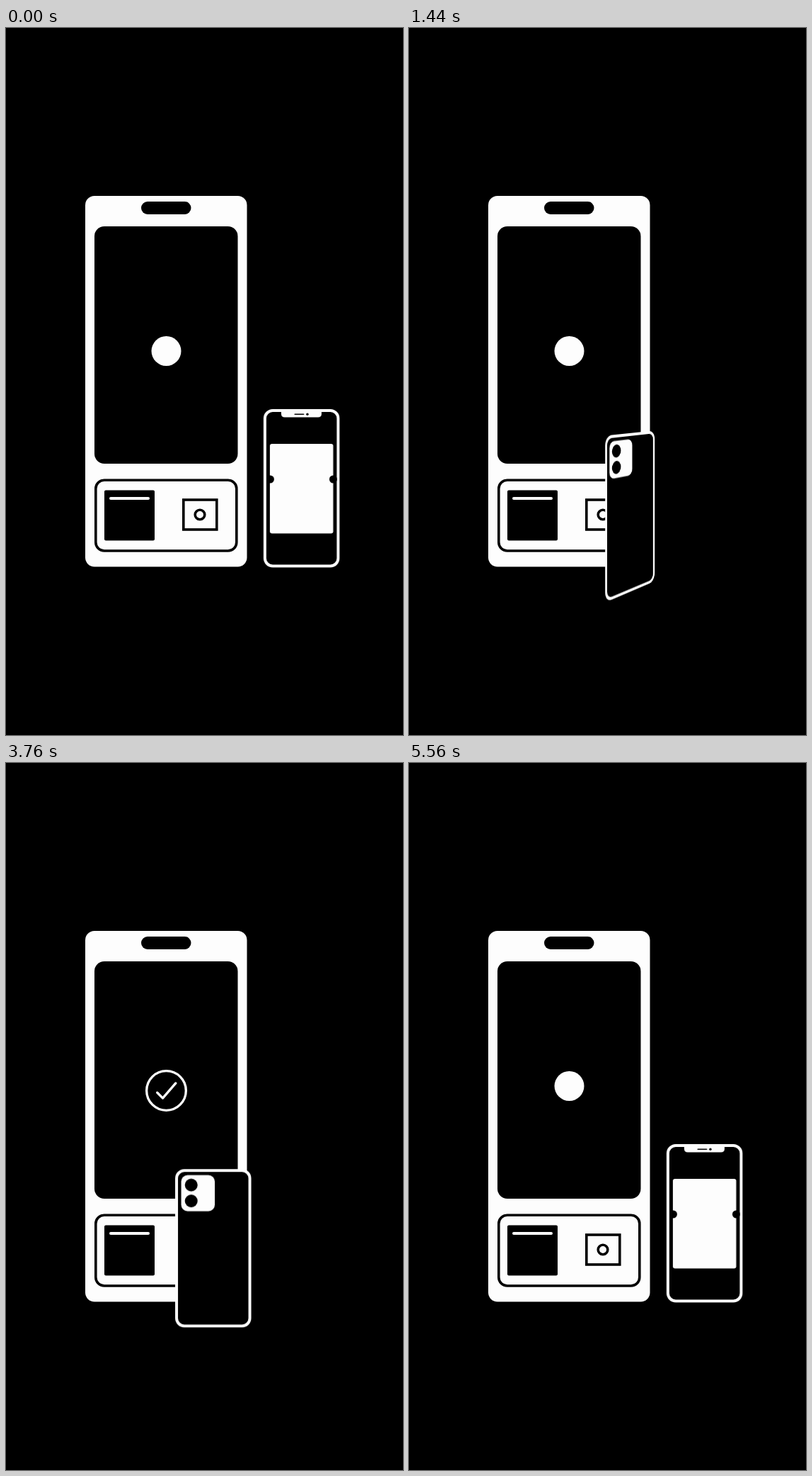
Write an HTML page that moves like this. It is 561 by 998 pixels and loops after 5920 ms.

```html
<!DOCTYPE html>
<html lang="en">
<head>
<meta charset="utf-8">
<title>Kiosk check-in</title>
<style>
  html, body { margin: 0; width: 100%; height: 100%; overflow: hidden; background: #000; }
  main { position: relative; width: 561px; height: 998px; overflow: hidden; perspective: 779px; }
  svg { position: absolute; left: 0; top: 0; display: block; overflow: visible; }
  #phone { position: absolute; left: 0; top: 0; width: 107.5px; height: 223.5px; transform-style: preserve-3d; }
  #phone svg { backface-visibility: hidden; }
  #back { transform: rotateY(180deg); }
  .white { fill: #fdfdfd; }
  .line { fill: none; stroke: #000; stroke-width: 3.6; }
  .case { fill: #000; stroke: #fdfdfd; stroke-width: 4; }
  .mark { fill: none; stroke: #fdfdfd; stroke-width: 3; stroke-linecap: round; stroke-linejoin: round; }
</style>
</head>
<body>
<main>
  <svg width="561" height="998">
    <rect class="white" x="112" y="237" width="228.5" height="523.5" rx="13"/>
    <rect x="191" y="245" width="70.5" height="18" rx="9"/>
    <rect x="125" y="280" width="202.5" height="335" rx="14"/>
    <rect class="line" x="126.8" y="638.3" width="199" height="99.7" rx="12"/>
    <rect x="139" y="652.5" width="71" height="71" rx="2"/>
    <rect class="white" x="146" y="662" width="57" height="4" rx="2"/>
    <rect class="line" x="250.8" y="666" width="47" height="42"/>
    <circle class="line" cx="274" cy="687" r="6.8"/>
    <circle id="badge" class="white" r="21"/>
    <g id="check" class="mark">
      <circle r="25"/>
      <path d="M-11.5 2.5 L-4.5 9.5 L12 -9.5"/>
    </g>
  </svg>
  <div id="phone">
    <svg id="front" width="107.5" height="223.5">
      <rect class="case" x="2" y="2" width="103.5" height="219.5" rx="11"/>
      <path class="white" d="M25 2 H82 V6.5 Q82 11.5 77 11.5 H30 Q25 11.5 25 6.5 Z"/>
      <rect x="43.5" y="6.5" width="14" height="1.6" rx=".8"/>
      <circle cx="62" cy="7.3" r="1.7"/>
      <rect class="white" x="9" y="49" width="89.5" height="126.5" rx="3"/>
      <circle cx="9.5" cy="99" r="5.5"/>
      <circle cx="98.5" cy="99" r="5.5"/>
    </svg>
    <svg id="back" width="107.5" height="223.5">
      <rect class="case" x="2" y="2" width="103.5" height="219.5" rx="11"/>
      <rect class="white" x="8.5" y="8.5" width="47.5" height="51" rx="9"/>
      <circle cx="22.7" cy="22.5" r="9"/>
      <circle cx="22.7" cy="45" r="9"/>
    </svg>
  </div>
</main>
<script>
const STEP = 40, STEPS = 148;

// Smooth curve through [step, value] keys that never overshoots them.
function track(...keys) {
  const rise = keys.slice(1).map(([s, v], i) => (v - keys[i][1]) / (s - keys[i][0]));
  const slope = keys.map((_, i) => {
    if (i === 0) return rise[0];
    const a = rise[i - 1], b = rise[i] ?? 0;
    return a * b > 0 ? 2 * a * b / (a + b) : 0;
  });
  return step => {
    if (step <= keys[0][0]) return keys[0][1];
    const i = keys.findIndex(([s]) => s > step) - 1;
    if (i < 0) return keys[keys.length - 1][1];
    const [s0, v0] = keys[i], [s1, v1] = keys[i + 1];
    const d = s1 - s0, u = (step - s0) / d, w = 1 - u;
    return v0 * (1 + 2 * u) * w * w + v1 * u * u * (3 - 2 * u)
      + d * u * w * (slope[i] * w - slope[i + 1] * u);
  };
}

const turn = track([8, 0], [15, 37.6], [21, 65], [23, 75], [30, 108], [36, 133], [38, 141], [45, 167], [53, 180]);
const phoneX = track([8, 417.6], [15, 377.6], [21, 341.3], [23, 331], [30, 320], [36, 314], [38, 310.5], [45, 298], [53, 292.8]);
const phoneY = track([8, 649.7], [15, 664.2], [21, 676], [23, 678.5], [30, 682], [36, 683.5], [45, 685], [53, 685]);
const badgeSize = track([38, 1], [45, 0]);
const checkSize = track([45, 0], [55, 1.2], [60, 1]);

const [phone, badge, check] = ['phone', 'badge', 'check'].map(id => document.getElementById(id));

function place(el, x, y, size) {
  el.setAttribute('transform', `translate(${x} ${y}) scale(${size})`);
  el.style.display = size > 0 ? '' : 'none';
}

function draw() {
  const index = Math.floor(performance.now() / STEP) % STEPS;
  const step = Math.min(index, STEPS - 1 - index); // plays forward, then back
  phone.style.transform =
    `translate(${phoneX(step) - 53.75}px, ${phoneY(step) - 111.75}px) rotateY(${-turn(step)}deg)`;
  place(badge, 226.5, 456, badgeSize(step));
  place(check, 226.5, 462.5, checkSize(step));
  requestAnimationFrame(draw);
}
draw();
</script>
</body>
</html>
```
